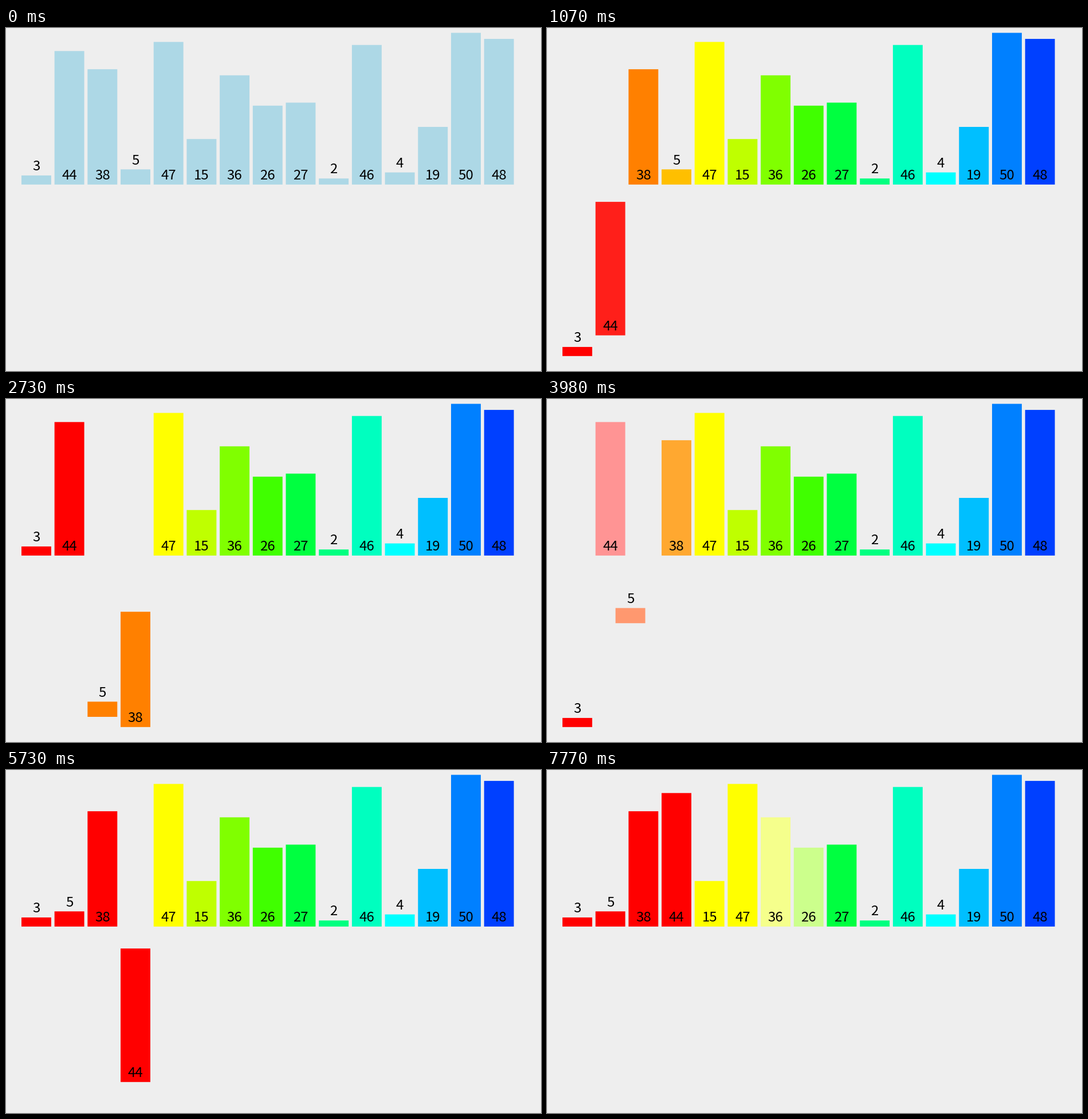
Animation, 934 px wide and 600 px high, one loop 8 s. Source, as a matplotlib script:

```python
import colorsys

import matplotlib.pyplot as plt
import numpy as np
from matplotlib.animation import FuncAnimation
from matplotlib.colors import to_rgb
from matplotlib.patches import Rectangle

W, H, DPI = 934, 600, 100
LOOP, STEP = 8000, 20

VALUES = [3, 44, 38, 5, 47, 15, 36, 26, 27, 2, 46, 4, 19, 50, 48]
COUNT = len(VALUES)
SCALE = 15 / 13
PITCH, BAR_W, UNIT, DROP = 50 * SCALE, 45 * SCALE, 4.6 * SCALE, 260 * SCALE
LEFT, BASE = 26.98, 273.85

# Stages follow each other evenly; colour changes are short and start late
FIRST, STAGE = -33, 298.8
MOVE, FADE, FADE_DELAY = 300, 160, 90

LIGHT_BLUE = np.array(to_rgb("#add8e6"))
TINTS = {2: "#ffa830", 6: "#f5ff8c", 7: "#ccff8c"}


def rainbow(i):
    """Hues 15 degrees apart, without pure green."""
    return np.array(colorsys.hsv_to_rgb((i + (i > 7)) * 15 / 360, 1, 1))


def pale(bar):
    if bar in TINTS:
        return np.array(to_rgb(TINTS[bar]))
    return colors[bar] + (1 - colors[bar]) * 0.58


def ease(t):
    t = min(max(t, 0), 1)
    return 4 * t ** 3 if t < 0.5 else 1 - 4 * (1 - t) ** 3


events = []  # (start, duration, bar, slot, drop, color); None = unchanged
slots = list(range(COUNT))  # bar standing in each slot
colors = [rainbow(i) for i in range(COUNT)]
stage = 0


def move(bar, slot, drop, color=None):
    global stage
    events.append((FIRST + STAGE * stage, MOVE, bar, slot, drop, color))
    stage += 1


def fade(bars, shades):
    global stage
    start = FIRST + STAGE * stage + FADE_DELAY
    events.extend((start, FADE, b, None, None, c) for b, c in zip(bars, shades))
    stage += 1


def merge(first, size):
    bars = slots[first:first + size]
    fade(bars, map(pale, bars))
    color = colors[bars[0]]
    bars.sort(key=lambda b: VALUES[b])
    for slot, b in enumerate(bars, first):
        move(b, slot, 1, color)
        slots[slot], colors[b] = b, color
    for b in bars:
        move(b, None, 0)


fade(slots, colors)
merge(0, 2)
merge(2, 2)
merge(0, 4)
merge(4, 2)
fade(slots[6:8], map(pale, slots[6:8]))


def poses(t):
    state = [[i, 0, LIGHT_BLUE] for i in range(COUNT)]
    for start, length, bar, *goal in events:
        p = ease((t - start) / length)
        for j, (end, q) in enumerate(zip(goal, (p, p, p ** 1.5))):
            if end is not None:
                state[bar][j] = state[bar][j] + (end - state[bar][j]) * q
    return state


fig = plt.figure(figsize=(W / DPI, H / DPI), dpi=DPI, facecolor="#eeeeee")
ax = fig.add_axes([0, 0, 1, 1])
ax.set_xlim(0, W)
ax.set_ylim(H, 0)
ax.axis("off")

rects, labels = [], []
for i, v in enumerate(VALUES):
    rects.append(ax.add_patch(Rectangle((0, 0), BAR_W, v * UNIT, lw=0,
                                        snap=False, zorder=i + 1)))
    labels.append(ax.text(0, 0, str(v), ha="center", va="baseline", color="black",
                          family=["Noto Sans CJK JP", "DejaVu Sans"],
                          size=24 * 72 / DPI, zorder=i + 1.5))


def draw(n):
    for v, rect, label, (slot, drop, color) in zip(VALUES, rects, labels, poses(n * STEP + STEP / 2)):
        x, bottom = LEFT + PITCH * slot, BASE + DROP * drop
        top = bottom - v * UNIT
        rect.set_xy((x, top))
        rect.set_facecolor(np.clip(color, 0, 1))
        label.set_position((x + BAR_W / 2, (top if v < 10 else bottom) - 8.8))
    return rects + labels


anim = FuncAnimation(fig, draw, frames=LOOP // STEP, interval=STEP,
                     init_func=lambda: draw(0), repeat=True, repeat_delay=0)
plt.show()
```
